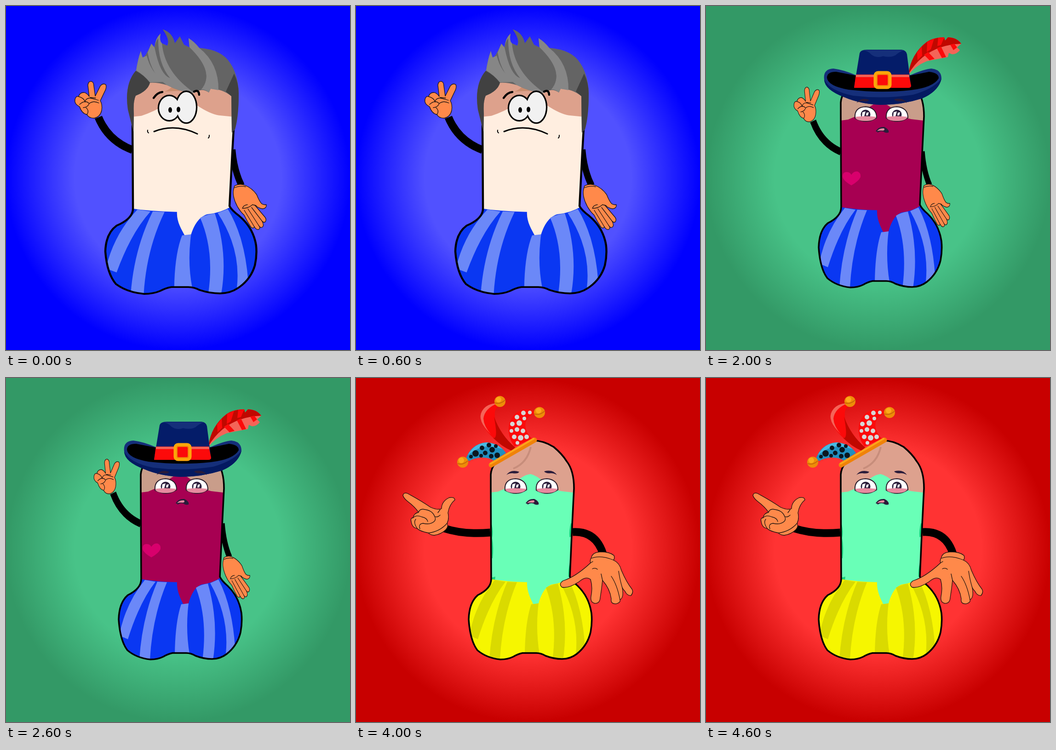
An HTML page for the animation above (5 s loop, 748 by 748 pixels).

```html
<!DOCTYPE html>
<html lang="en">
<head>
<meta charset="utf-8">
<title>Costume parade</title>
<style>
html, body { margin: 0; width: 100%; height: 100%; overflow: hidden; }
svg { display: block; width: 100vw; height: 100vh; }
.scene { display: none; }
.skin { fill: var(--skin); }
.top { fill: var(--top); }
.cloth { fill: var(--cloth); }
.stripe { fill: var(--stripe); }
.line { fill: none; stroke: #000; stroke-linecap: round; stroke-linejoin: round; }
.arm { fill: none; stroke: #000; stroke-width: 17; }
.hand { fill: #ff894a; stroke: #1d1410; stroke-width: 1.3; stroke-linejoin: round; stroke-linecap: round; }
.hand .crease { fill: none; }
.red { fill: #fc0a0a; } .pale { fill: #f46458; } .deep { fill: #c00800; }
.ink { fill: #2a1c3a; }
</style>
</head>
<body>
<svg viewBox="0 0 748 748">
<defs>
  <path id="b" d="M293 235 L293 210 Q294 196 302 187 Q325 165 385 136 Q408 136 430 150 Q449 166 458 181 Q474 201 474 240 L470 320 L465 432 Q469 441 482 452 Q507 476 512 512 Q514 532 510 553 Q503 582 480 600 Q466 611 448 611 Q430 611 412 604 Q402 598 392 598 L362 598 Q352 600 342 606 Q330 612 314 612 Q284 609 264 592 Q248 571 245 525 Q246 488 265 472 Q294 458 294 437Z"/>
  <clipPath id="clip"><use href="#b"/></clipPath>
  <clipPath id="wide"><use href="#b" transform="matrix(1.1157 0 0 1.061 -43.3 -23.3)"/></clipPath>

  <g id="torso">
    <use href="#b" class="skin"/>
    <path class="top" clip-path="url(#clip)" d="M285 250 L309 247 Q332 238 348 226 Q365 210 380 209 Q393 212 408 226 Q430 243 446 246 L480 250 L520 620 H240Z"/>
  </g>
  <use id="outline" href="#b" class="line" stroke-width="3.6"/>

  <g id="bloomers" clip-path="url(#clip)">
    <path class="cloth" d="M285 436 Q325 443 372 444 C371 464 380 480 386 493 L397 490 C402 472 410 455 425 449 Q450 446 468 433 L530 480 V620 H230 V450Z"/>
    <g class="stripe">
      <path d="M302 439 L325 443 Q290 488 265 568 L246 560 Q260 490 302 439Z"/>
      <path d="M329 443 L350 444 Q318 520 313 612 H290 Q296 520 329 443Z"/>
      <path d="M381 492 L397 490 Q390 545 399 600 H367 Q368 530 381 492Z"/>
      <path d="M413 456 Q424 449 439 447 Q463 530 450 614 H427 Q439 525 413 456Z"/>
      <path d="M444 446 L462 438 Q492 495 498 585 L478 600 Q486 520 444 446Z"/>
    </g>
  </g>

  <g id="mint" fill="#19d37f">
    <path d="M295 318 Q299 334 296 348 Q300 370 297 392 H294Z M467 316 Q463 330 464 346 L469 345 470 316Z M465 402 Q461 416 462 432 H466Z M294 434 L303 432 302 440 294 438Z"/>
  </g>

  <g id="casualArms" class="arm">
    <path d="M201 242 Q222 293 275 313"/>
    <path d="M492 312 Q496 358 512 390" stroke-width="14"/>
  </g>
  <g id="casualHands" class="hand">
    <path d="M181 197 L178 172 Q179 163 186 164 Q191 166 191 174 L194 196 L205 174 Q211 167 217 171 Q219 176 216 183 L205 206 Q210 214 208 227 Q205 241 192 244 Q180 244 176 236 Q165 234 160 219 Q148 213 150 203 Q152 195 158 197 Q160 188 170 188 Q177 190 181 197Z"/>
    <path class="crease" d="M158 197 Q170 200 172 209 M160 214 Q172 203 181 212 Q178 220 168 221 M172 207 Q176 198 187 201 L201 205 M181 212 Q190 205 202 211 M176 236 Q182 228 174 221 M183 199 L195 200"/>
    <path d="M497 391 Q508 385 520 390 Q535 396 545 410 Q551 425 556 430 Q561 433 566 432 Q567 440 558 441 Q550 440 541 433 L563 459 Q567 464 564 469 Q561 472 557 468 Q562 478 557 481 Q553 483 550 478 Q554 484 549 486 Q544 487 540 480 Q538 485 533 481 Q524 468 518 455 Q505 443 498 425 Q492 408 495 398Z"/>
    <path class="crease" d="M534 438 L557 468 M526 441 L550 478 M518 444 L540 480 M515 440 Q527 440 536 432 L544 434 M497 395 Q510 390 521 393 M514 440 Q516 433 525 432"/>
  </g>

  <g id="palm">
    <path class="arm" d="M236 255 Q246 318 285 345" stroke-width="18"/>
    <g class="hand">
      <path d="M210 232 C205 215 195 205 193 190 C188 170 184 150 186 135 Q188 125 192 128 Q192 119 199 115 Q205 112 209 117 Q217 112 222 121 Q231 117 235 128 L246 167 Q248 172 252 166 Q260 157 272 161 Q275 166 271 173 Q264 182 262 196 Q260 212 250 228 Q260 230 258 241 Q248 257 226 264 Q208 259 207 245 Q205 237 210 232Z"/>
      <path class="crease" d="M192 128 Q195 155 205 179 M209 117 L219 178 M222 121 L233 178 M202 186 Q212 181 218 184 Q226 179 241 180 M250 180 Q229 185 234 205 M210 246 Q234 252 254 230"/>
    </g>
  </g>

  <g id="fist">
    <path class="arm" d="M254 265 Q260 325 286 358"/>
    <g class="hand">
      <path d="M222 240 Q217 222 222 212 Q226 205 233 208 Q238 198 247 203 Q256 198 262 206 Q270 204 276 212 Q290 225 290 240 Q284 252 273 256 Q273 268 268 270 Q250 277 238 271 Q232 268 236 258 Q226 252 222 240Z"/>
      <path class="crease" d="M233 208 Q228 224 234 243 M247 203 Q241 220 246 242 M262 206 Q255 220 257 235 M224 238 Q229 244 234 240 Q241 247 246 239 Q253 244 258 235 Q266 239 278 228 M260 232 Q258 216 268 215 L284 232 M237 262 Q254 268 272 257"/>
    </g>
  </g>

  <g id="teary">
    <g id="tearyEye">
      <path d="M324 244 Q322 220 347 219 Q371 221 371 243 Q350 258 324 244Z" fill="#fff" stroke="#2a1c2a" stroke-width="2"/>
      <circle class="ink" cx="347" cy="236" r="10.5"/>
      <path d="M340 231 L347 229 344 240 339 240Z M349 232 L354 231 352 238 348 238Z" fill="#fff"/>
      <path d="M325 241 Q347 238 370 241 Q367 250 347 250 Q330 250 325 244Z" fill="#e78a9f"/>
    </g>
    <use href="#tearyEye" x="68"/>
    <path class="ink" d="M327 211 Q336 198 355 204 Q352 209 340 207 Q332 207 327 211Z M437 211 Q428 198 409 203 Q412 208 424 207 Q431 207 437 211Z M369 272 Q375 262 388 263 Q399 269 397 275 Q390 277 386 273 Q378 271 374 275Z"/>
    <path d="M372 272 Q377 265 387 266 Q390 270 385 271 Q378 270 372 272Z" fill="#e78a9f"/>
  </g>
</defs>

<!-- Grey hair -->
<g class="scene" style="--skin:#dda18c;--top:#ffeee0;--cloth:#0a37f2;--stripe:#6b88f8">
  <use href="#casualArms"/>
  <g transform="matrix(1.2276 0 0 1.061 -84.8 -23.3)"><use href="#torso"/><use href="#bloomers"/><use href="#outline"/></g>
  <use href="#casualHands"/>
  <path d="M345 186 Q358 181 364 172 L388 184Z" fill="#c98d6f"/>
  <path fill="#646464" d="M277 273 L265 225 Q257 170 283 140 Q287 115 293 98 L297 112 Q303 112 316 82 L323 90 Q325 70 336 60 Q333 76 338 81 L350 87 Q358 75 341 51 Q362 58 367 81 L378 66 L387 84 L399 90 L397 70 Q410 78 420 91 Q470 95 488 125 Q505 150 506 190 Q506 240 498 268 L491 275 L490 196 Q470 180 445 180 L441 188 Q425 177 410 189 Q380 188 350 172 Q330 166 313 167 Q308 185 282 195 Q276 208 278 235Z"/>
  <path fill="#414141" d="M277 273 L265 225 Q257 170 282 141 Q300 150 313 167 Q308 185 282 195 Q276 208 278 235Z M496 147 Q506 168 506 190 Q506 240 498 268 L491 275 L490 196 L478 186Z"/>
  <path fill="#868686" d="M283 140 Q287 115 293 98 L297 112 L306 108 Q315 145 345 165 L313 166 Q300 150 283 140Z M308 101 L316 82 L323 90 Q325 70 336 60 Q333 76 339 81 Q345 145 410 189 Q380 188 350 172 Q316 150 308 101Z M399 90 L397 70 Q410 78 420 91 Q463 125 462 183 L445 180 L441 188 Q431 180 424 182 Q456 145 399 90Z"/>
  <path fill="#646464" d="M323 90 Q325 78 331 70 Q330 125 357 157 Q335 150 323 90Z M339 81 L352 87 Q358 75 341 51 Q362 58 367 81 L399 90 Q456 145 424 182 Q375 170 339 81Z"/>
  <g class="line" stroke-width="4.5">
    <path d="M321 200 Q329 188 340 187 M409 186 Q419 181 420 193"/>
    <ellipse cx="355" cy="222" rx="23" ry="27"/><ellipse cx="392" cy="220" rx="22" ry="34"/>
  </g>
  <g fill="#f1f1f1"><ellipse cx="355" cy="222" rx="22" ry="26"/><ellipse cx="392" cy="220" rx="21" ry="33"/></g>
  <ellipse cx="357" cy="226" rx="4" ry="6"/><ellipse cx="375" cy="225" rx="4" ry="6"/>
  <path class="line" stroke-width="3" d="M322 273 Q367 255 416 278"/>
  <path class="line" stroke-width="2" d="M308 270 Q307 274 310 276 M442 281 Q442 286 440 287"/>
</g>

<!-- Winter hat -->
<g class="scene" style="--skin:#fdfd00;--top:#fdfd00">
  <ellipse cx="189" cy="175" rx="22" ry="27" fill="#dedede"/>
  <g fill="#b9b9b9"><circle cx="182" cy="160" r="4"/><circle cx="175" cy="173" r="3"/><circle cx="184" cy="178" r="4"/><circle cx="177" cy="187" r="3"/><circle cx="186" cy="194" r="3"/><circle cx="173" cy="164" r="2"/></g>
  <path class="red" d="M285 182 L287 155 Q262 165 236 166 V146 Q270 125 290 90 Q320 36 378 34 Q440 34 457 80 Q460 95 457 108 Q470 112 469 125 Q478 148 478 182Z"/>
  <path class="pale" d="M236 150 Q270 125 290 90 Q320 36 378 34 Q415 33 434 48 Q380 36 342 68 Q323 90 308 109 Q285 140 243 152Z M395 137 Q430 140 455 136 Q467 130 469 118 Q478 148 478 182 L469 182 Q467 150 452 141 Q425 143 395 137Z"/>
  <path class="deep" d="M270 160 Q300 112 345 111 Q405 113 428 121 Q452 124 466 111 Q462 126 436 125 Q350 119 308 144 Q300 155 303 182 H285 L287 155Z"/>
  <use href="#palm"/><use href="#palm" transform="matrix(-1 0 0 1 764 0)"/>
  <g transform="matrix(1.1157 0 0 1.061 -43.3 -23.3)"><use href="#torso"/></g>
  <g clip-path="url(#wide)">
    <path d="M220 440 L285 442 Q320 451 380 451 Q440 452 480 436 L540 450 V640 H220Z" fill="#1b1819"/>
    <path d="M258 470 V620 M278 455 V620 M311 453 V630 M348 453 V630 M375 453 V630 M399 453 V630 M429 450 V630 M460 445 V630 M494 460 V620" stroke="#454344" stroke-width="3.5"/>
    <path class="line" stroke-width="3.5" d="M285 442 Q320 451 380 451 Q440 452 480 436"/>
  </g>
  <use href="#outline" transform="matrix(1.1157 0 0 1.061 -43.3 -23.3)"/>
  <!-- repeat the red crown over the head -->
  <path class="red" d="M303 182 Q300 155 308 144 Q340 117 420 124 L457 130 Q474 150 470 182Z"/>
  <path class="pale" d="M395 137 Q430 140 455 136 Q467 130 469 118 Q478 148 478 182 L469 182 Q467 150 452 141 Q425 143 395 137Z"/>
  <path class="deep" d="M285 182 L287 155 Q305 122 345 111 Q405 113 428 121 L436 125 Q350 119 308 144 Q300 155 303 182Z"/>
  <rect x="274" y="178" width="214" height="70" rx="11" fill="#aaa"/>
  <rect x="276" y="178" width="211" height="64" rx="10" fill="#c9c9c9"/>
  <path d="M283 182 H479" stroke="#d8d8d8" stroke-width="4"/>
  <path fill="#238219" d="M331 173 Q346 178 355 165 Q357 175 366 177 L371 192 Q361 196 354 191 Q346 198 339 192 Q343 182 331 173Z M373 184 Q371 171 380 166 Q378 156 389 160 Q398 157 403 150 Q400 161 405 170 Q395 172 396 181 Q386 181 379 190Z"/>
  <path fill="#55a92d" d="M331 173 Q346 178 355 165 Q357 175 366 177 L371 192Z M373 184 Q371 171 380 166 Q378 156 389 160 Q398 157 403 150Z"/>
  <g fill="#f58478" stroke="#f01010" stroke-width="5"><circle cx="373" cy="193" r="5"/><circle cx="386" cy="200" r="5"/><circle cx="369" cy="206" r="5"/></g>
  <g fill="#fff" stroke="#2a1c3a" stroke-width="3.5" stroke-linejoin="round">
    <path d="M304 232 Q309 207 335 207 Q353 208 360 223 Q331 219 304 232Z M434 235 Q432 210 405 208 Q386 207 378 223 Q411 221 434 235Z"/>
    <path fill="none" stroke-width="5" stroke-linecap="round" d="M312 201 Q317 184 338 184 M407 185 Q429 184 430 204"/>
  </g>
  <path class="ink" d="M309 227 Q310 216 318 212 Q324 216 317 224Z M387 220 Q388 212 396 211 Q403 216 397 221Z"/>
  <path d="M313 219 L317 216 M391 217 L395 214" stroke="#fff" stroke-width="2"/>
  <path class="ink" d="M331 249 Q365 261 398 252 Q392 270 381 281 Q372 294 358 293 Q350 289 352 276 Q350 259 331 249Z"/>
  <path d="M341 255 Q367 262 393 256 L388 263 Q367 268 349 263Z" fill="#fff"/>
  <path d="M354 287 Q360 277 379 277 Q370 292 358 291Z" fill="#e58bb0"/>
</g>

<!-- Feathered hat -->
<g class="scene" style="--skin:#c99d8a;--top:#a70052;--cloth:#0a37f2;--stripe:#6b88f8">
  <use href="#casualArms" transform="matrix(.8146 0 0 .9425 69.1 22)"/>
  <use href="#torso"/><use href="#bloomers"/><use href="#outline"/>
  <use href="#casualHands" transform="matrix(.8146 0 0 .9425 69.1 22)"/>
  <path fill="#d8006c" d="M316 390 Q297 379 297 370 Q297 361 306 361 Q313 361 316 367 Q322 358 330 360 Q337 363 336 372 Q332 381 316 390Z"/>
  <path class="pale" d="M440 150 Q446 104 480 78 Q495 68 518 68 L520 75 L526 68 Q545 68 555 82 L546 90 L552 96 Q545 105 535 105 L528 102 L526 111 Q500 116 480 120 Q455 130 440 150Z"/>
  <path class="deep" d="M440 148 Q446 104 480 78 Q495 68 518 68 L520 75 L526 68 Q545 68 555 82 Q478 85 440 148Z"/>
  <path class="red" d="M459 101 L469 88 L470 108 L460 118Z M481 78 L496 71 L489 94 L480 100Z M505 69 L518 68 L511 85 L503 87Z M474 106 L483 100 L497 115 L486 118Z M502 92 L511 88 L522 111 L513 113Z M531 84 L540 82 L546 90 L538 96Z"/>
  <path fill="#152f7a" d="M257 160 Q254 137 277 136 Q300 139 325 150 H445 Q475 137 490 136 Q512 138 512 158 Q506 185 470 201 Q425 215 380 215 Q335 213 300 198 Q258 182 257 160Z"/>
  <path fill="#041a61" d="M257 160 Q270 185 320 195 Q385 203 450 193 Q495 180 512 158 Q506 185 470 201 Q425 215 380 215 Q335 213 300 198 Q258 182 257 160Z"/>
  <path d="M263 156 Q263 143 283 143 L330 152 H440 L485 143 Q506 145 506 157 Q495 177 445 183 Q380 190 310 182 Q265 174 263 156Z"/>
  <path fill="#041c69" d="M322 176 L334 103 Q336 95 350 95 H425 Q435 96 437 105 L446 176Z"/>
  <path fill="#152f7a" d="M341 96 H430 Q420 100 412 107 Q401 113 385 109 Q371 114 360 106 Q352 97 341 96Z"/>
  <path class="red" d="M326 149 H441 L446 173 Q446 178 440 178 H322Z"/>
  <path d="M326 152 H442" stroke="#f46458" stroke-width="5"/>
  <rect x="368" y="145" width="32" height="32" rx="6" class="red" stroke="#fca60a" stroke-width="7"/>
  <rect x="372" y="149" width="24" height="24" rx="3" fill="none" stroke="#f07e08" stroke-width="2"/>
  <use href="#teary"/>
</g>

<!-- Peaked cap -->
<g class="scene" style="--skin:#dda18e;--top:#69ffb7">
  <use href="#fist"/><use href="#fist" transform="matrix(-1 0 0 1 764 0)"/>
  <g transform="matrix(1.1157 0 0 1.061 -43.3 -23.3)"><use href="#torso"/><use href="#mint"/></g>
  <g clip-path="url(#wide)">
    <path fill="#602a08" d="M220 455 Q380 500 540 445 V640 H220Z"/>
    <path fill="#402310" d="M284 474 Q262 530 281 575 Q292 600 313 606 Q266 545 316 472Z M470 470 Q488 550 447 613 Q496 590 495 530 Q490 490 476 462Z M264 476 Q224 530 258 606 Q240 550 264 476Z M486 462 Q530 520 508 596 Q535 560 530 490Z"/>
    <path fill="#a66a29" d="M278 436 Q330 457 381 457 Q440 456 482 434 L490 453 Q440 480 380 479 Q320 478 276 460Z"/>
    <g class="red"><circle cx="291" cy="451" r="4"/><circle cx="328" cy="462" r="4"/><circle cx="338" cy="464" r="4"/><circle cx="416" cy="465" r="4"/><circle cx="426" cy="464" r="4"/><circle cx="470" cy="449" r="4"/></g>
    <path d="M302 456 L313 459 M369 467 H388 M444 461 L455 458" stroke="#188a0c" stroke-width="7" stroke-linecap="round"/>
  </g>
  <use href="#outline" transform="matrix(1.1157 0 0 1.061 -43.3 -23.3)"/>
  <!-- hands rest over the cheeks -->
  <use href="#fist" clip-path="inset(0 0 60% 0)"/>
  <path fill="#152b7a" d="M265 132 L299 106 Q299 100 305 97 L370 61 Q381 54 392 61 L457 94 Q465 98 464 105 L496 128 Q500 133 497 138 L472 173 H294 L266 140Z"/>
  <path fill="#041b62" d="M265 132 L299 106 L326 142 L308 173 H294 L266 140Z M464 105 L496 128 Q500 133 497 138 L472 173 H456 L438 142Z"/>
  <path d="M381 131 Q361 123 362 110 Q366 98 360 90 L367 84 Q374 88 381 84 Q388 88 395 84 L403 90 Q397 98 400 110 Q401 123 381 131Z" fill="#fcac05" stroke="#ef7a08" stroke-width="3.5"/>
  <rect x="303" y="154" width="157" height="15" rx="5" fill="#f57c08"/>
  <path fill="#474747" d="M307 145 Q381 137 456 145 V178 Q452 207 420 214 H342 Q311 206 307 180Z"/>
  <path d="M308 150 Q381 141 455 150 V176 Q381 162 308 176Z"/>
  <path fill="#262626" d="M320 149 L334 147 V171 L320 173Z M365 146 H397 V169 H365Z M413 147 L427 148 V171 L413 170Z"/>
  <path fill="#525252" d="M311 178 Q381 163 452 178 Q449 203 418 210 H344 Q314 203 311 178Z"/>
  <path fill="#626262" d="M334 173 L358 171 V210 H344 L334 205Z M378 170 H412 V210 H378Z"/>
  <path class="line" stroke-width="3" d="M308 174 V180 Q312 205 342 213 H420 Q451 205 455 178 V174" style="stroke:#222"/>
  <path d="M326 245 Q325 223 343 220 Q352 219 357 225 Q362 212 376 212 Q394 215 393 245 Q373 238 357 248 Q342 241 326 245Z" fill="#d3e9ff" stroke="#000" stroke-width="1.8"/>
  <path d="M338 243 Q339 233 348 233 Q355 235 356 246 Q347 241 338 243Z M367 242 Q367 229 377 229 Q386 231 386 242 Q377 239 367 242Z"/>
  <path class="line" stroke-width="1.8" d="M322 247 Q343 242 357 249 Q374 239 396 247 M323 275 Q340 274 350 266 Q357 261 365 266 Q380 275 399 277 M352 276 Q358 278 364 276 M379 268 Q386 270 389 266 M330 276 L336 278"/>
  <path class="line" stroke-width="2.6" d="M324 214 Q326 204 340 203 M370 200 Q380 197 383 207"/>
</g>

<!-- Jester -->
<g class="scene" style="--skin:#dda18e;--top:#69ffb7;--cloth:#f6f600;--stripe:#dada00">
  <g class="arm"><path d="M192 327 Q235 341 292 336"/><path d="M471 335 Q521 332 537 382"/></g>
  <use href="#torso"/><use href="#mint"/><use href="#bloomers"/>
  <path d="M380 150 Q372 185 342 197" fill="none" stroke="#c78d7b" stroke-width="4"/>
  <use href="#outline"/>
  <g class="hand">
    <path d="M102 255 Q104 248 112 251 Q140 266 162 281 Q178 288 186 284 Q186 268 203 260 Q214 258 215 265 Q203 275 200 293 Q203 306 198 316 Q202 322 195 330 Q185 340 170 342 Q160 341 158 337 Q138 333 133 327 Q122 326 120 312 Q118 304 124 304 Q126 294 136 292 Q128 280 112 268 Q104 262 102 255Z"/>
    <path class="crease" d="M136 292 Q139 283 150 286 Q166 288 171 301 Q177 304 183 298 M124 304 Q131 297 143 302 Q154 304 156 312 M133 327 Q124 314 130 307 M139 328 Q135 317 146 316 Q162 320 171 311 Q174 306 171 301 M183 286 L178 293 M158 337 Q182 334 198 316"/>
    <path d="M512 390 Q514 379 532 378 Q552 378 561 386 Q563 392 560 396 Q573 402 577 418 Q588 444 600 459 Q604 466 598 473 Q590 474 585 464 Q582 461 579 456 Q583 478 574 482 Q576 488 566 491 Q553 492 555 480 Q552 458 536 440 Q534 460 531 478 Q530 491 519 490 Q509 488 511 475 Q515 455 510 438 Q500 430 485 443 Q462 458 448 455 Q440 448 450 441 Q478 432 510 402 Q508 396 512 390Z"/>
    <path class="crease" d="M512 392 Q532 384 560 396 M510 402 L515 399 M514 415 Q520 412 525 416 M536 440 L533 426 M574 482 Q568 450 555 431 M579 456 Q574 440 571 420"/>
  </g>
  <path class="red" d="M338 158 Q318 150 293 125 Q262 92 274 72 Q284 55 308 55 L312 60 Q298 66 303 90 Q315 125 346 151Z"/>
  <path class="pale" d="M293 122 Q262 92 274 72 Q284 55 308 55 Q280 66 277 88 Q278 105 293 122Z"/>
  <path class="deep" d="M338 158 Q318 150 298 130 Q310 135 300 84 Q315 125 346 151Z"/>
  <path class="red" d="M345 149 Q328 128 333 100 Q342 69 372 68 Q385 70 392 76 Q370 82 368 102 Q369 120 383 132Z"/>
  <g fill="#d6d6d6"><circle cx="350" cy="85" r="5"/><circle cx="364" cy="76" r="5"/><circle cx="340" cy="100" r="5"/><circle cx="355" cy="98" r="6"/><circle cx="338" cy="115" r="4"/><circle cx="350" cy="112" r="5"/><circle cx="363" cy="115" r="5"/><circle cx="344" cy="128" r="5"/><circle cx="358" cy="130" r="6"/><circle cx="371" cy="128" r="5"/><circle cx="351" cy="141" r="4"/><circle cx="378" cy="75" r="4"/><circle cx="366" cy="88" r="4"/></g>
  <path fill="#218fc0" d="M238 178 Q250 142 284 140 Q312 142 326 163 L300 180 Q290 172 270 173 Q255 175 247 180Z"/>
  <path fill="#48b9e3" d="M243 168 Q257 142 284 140 Q305 142 319 155 Q295 146 276 150 Q256 156 243 168Z"/>
  <g fill="#0b1720"><circle cx="260" cy="164" r="7"/><circle cx="274" cy="152" r="5"/><circle cx="289" cy="146" r="5"/><circle cx="281" cy="163" r="5"/><circle cx="296" cy="156" r="6"/><circle cx="307" cy="168" r="6"/><circle cx="294" cy="170" r="5"/><circle cx="304" cy="148" r="4"/><circle cx="250" cy="171" r="4"/><circle cx="272" cy="169" r="4"/></g>
  <path d="M294 189 L388 135" stroke="#f08208" stroke-width="11" stroke-linecap="round"/>
  <path d="M293 186 L386 132" stroke="#fca51a" stroke-width="4" stroke-linecap="round"/>
  <g fill="#ee8c08"><circle cx="313" cy="51" r="12"/><circle cx="399" cy="75" r="12"/><circle cx="232" cy="183" r="12"/></g>
  <g fill="#fcaa1a"><circle cx="310" cy="47" r="6"/><circle cx="397" cy="71" r="6"/><circle cx="229" cy="179" r="6"/></g>
  <path d="M302 54 Q314 58 324 48 M388 78 Q400 82 410 72 M221 186 Q233 190 243 180" fill="none" stroke="#c96a08" stroke-width="2"/>
  <use href="#teary"/>
</g>
</svg>
<script>
const stage = document.querySelector("svg");
const scenes = [...document.querySelectorAll(".scene")];
const glows = [["#5151ff", "#0000ff"], ["#ff5cff", "#ff00ff"], ["#48c388", "#339966"], ["#ffff88", "#eaea00"], ["#ff3333", "#c80000"]];
const hold = 1000;

function draw(now) {
  const at = Math.floor(now / hold) % scenes.length;
  const [inner, outer] = glows[at];
  stage.style.background = `radial-gradient(circle closest-side, ${inner} 60%, ${outer} 100%)`;
  scenes.forEach((scene, i) => scene.style.display = i === at ? "inline" : "none");
  requestAnimationFrame(draw);
}
draw(performance.now());
</script>
</body>
</html>
```
